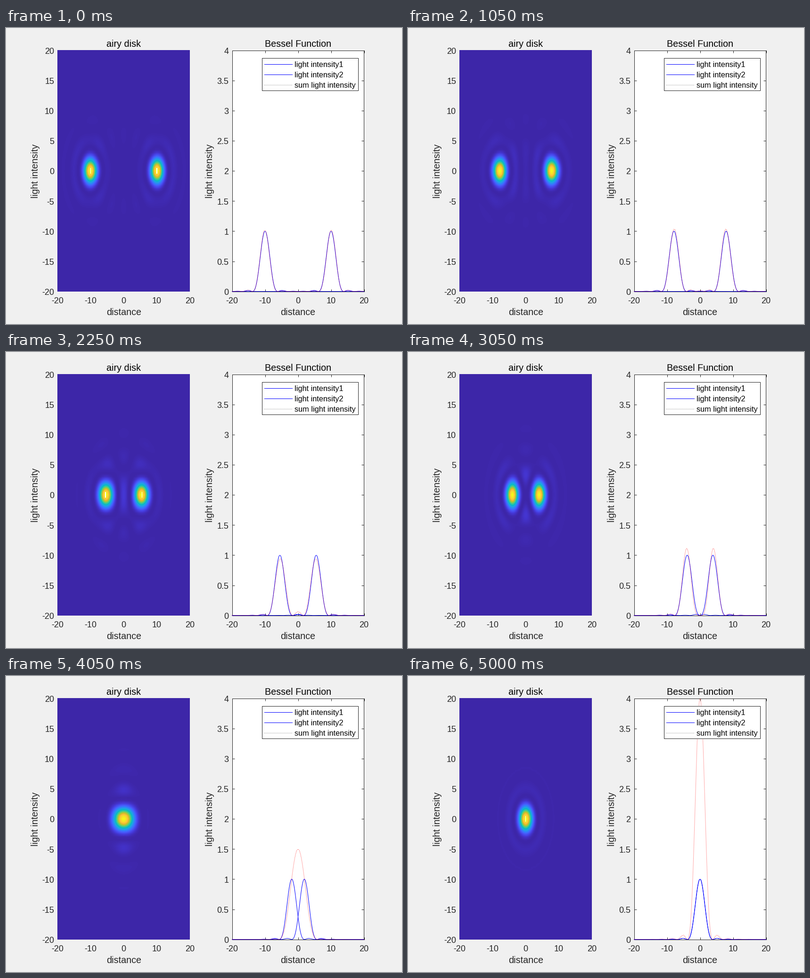
A matplotlib script for the animation above (5.05 s loop, 840 by 630 pixels).

```python
import numpy as np
import matplotlib.pyplot as plt
from matplotlib.animation import FuncAnimation
from matplotlib.colors import LinearSegmentedColormap
from matplotlib.lines import Line2D
from matplotlib.patches import Rectangle
from matplotlib.transforms import Affine2D

W, H, DPI = 840, 630, 100
FRAMES, STEP_MS = 101, 50
PT = 72 / DPI
GREY = (0.15, 0.15, 0.15)
DOTS = (0, (1, 2))

# Panel edges in pixels from the top left
LEFT, RIGHT = (109.2, 390.35), (479.5, 759.5)
TOP, BOTTOM = 47.25, 560.7

plt.rcParams["font.family"] = "Liberation Sans"

PARULA = [
    (.2422, .1504, .6603), (.2647, .1978, .7952), (.2783, .2559, .8991),
    (.2810, .3228, .9579), (.2699, .3892, .9906), (.2206, .4603, .9973),
    (.1786, .5289, .9682), (.1540, .5902, .9218), (.1248, .6459, .8883),
    (.0689, .6948, .8394), (.0067, .7312, .7660), (.1408, .7584, .6842),
    (.2161, .7843, .5923), (.3406, .8008, .4789), (.5044, .7993, .3480),
    (.6720, .7793, .2227), (.8203, .7498, .1535), (.9393, .7288, .2100),
    (.9970, .7659, .2199), (.9786, .8386, .1766), (.9597, .9135, .1423),
    (.9769, .9839, .0805),
]
cmap = LinearSegmentedColormap.from_list("parula", PARULA)
cmap.set_bad("white")

# Airy amplitude 2*J1(r)/r, tabulated once from Bessel's integral
theta = (np.arange(120) + 0.5) * np.pi / 120
r_tab = np.linspace(0, 45, 9001)
j1 = np.cos(theta - r_tab[:, None] * np.sin(theta)).mean(axis=1)
amp_tab = np.ones_like(r_tab)
amp_tab[1:] = 2 * j1[1:] / r_tab[1:]


def airy(r):
    """Amplitude at distance r; undefined (0/0) exactly at the centre."""
    return np.where(r == 0, np.nan, np.interp(r, r_tab, amp_tab))


half = -20 + 0.1 * np.arange(201)
x = np.concatenate([half, -half[-2::-1]])
y = np.linspace(-20, 20, 81)[:, None]


def cells(n, first, lo, hi, count):
    """Grid cell and fraction inside it for each of n pixel centres."""
    pos = (first + 0.5 + np.arange(n) - lo) / (hi - lo) * count
    i = np.minimum(pos.astype(int), count - 1)
    return i, pos - i


NX, NY = 281, 514
ix, fx = cells(NX, 109, *LEFT, 400)
iy, fy = cells(NY, 47, TOP, BOTTOM, 80)
fy = fy[:, None]


def shade(z):
    """Interpolated shading; cells touching an undefined corner stay empty."""
    rows = z[iy] * (1 - fy) + z[iy + 1] * fy
    return rows[:, ix] * (1 - fx) + rows[:, ix + 1] * fx


fig = plt.figure(figsize=(W / DPI, H / DPI), dpi=DPI, facecolor="#f0f0f0")
px = Affine2D().scale(1 / W, -1 / H).translate(0, 1) + fig.transFigure


def panel(x0, x1, top, bottom):
    return fig.add_axes([x0 / W, 1 - bottom / H, (x1 - x0) / W, (bottom - top) / H])


def label(cx, base, s, size, color=GREY, ha="center", rot=0):
    va = "center" if rot else "baseline"
    fig.text(cx, base, s, fontsize=size * PT, color=color, ha=ha, va=va,
             rotation=rot, transform=px)


def label_axes(edges, title, ylabel_x, yticks, ylim):
    x0, x1 = edges
    mid = (x0 + x1) / 2
    for v in (-20, -10, 0, 10, 20):
        label(x0 + (v + 20) / 40 * (x1 - x0), 586, str(v), 18)
    for v in yticks:
        ty = BOTTOM - (v - ylim[0]) / (ylim[1] - ylim[0]) * (BOTTOM - TOP)
        label(x0 - 7, ty + 7.5, f"{v:g}", 18, ha="right")
    label(mid, 40, title, 19.8, "black")
    label(mid, 611, "distance", 19.8)
    label(ylabel_x, 304, "light intensity", 19.8, rot=90)


# Left panel: intensity map
ax_map = panel(109, 109 + NX, 47, 47 + NY)
ax_map.axis("off")
img = ax_map.imshow(np.zeros((NY, NX)), cmap=cmap, aspect="auto",
                    interpolation="nearest")
label_axes(LEFT, "airy disk", 62, range(-20, 21, 5), (-20, 20))

# Right panel: section through both centres
ax = panel(*RIGHT, 47.5, BOTTOM)
ax.set(xlim=(-20, 20), ylim=(0, 4), xticks=range(-20, 21, 10),
       yticks=np.arange(0, 4.1, 0.5))
ax.tick_params(direction="in", length=5 * PT, width=PT, color=GREY, top=True,
               right=True, labelbottom=False, labelleft=False)
ax.set_axisbelow(True)
for spine in ax.spines.values():
    spine.set(linewidth=PT, color=GREY, zorder=1)
label_axes(RIGHT, "Bessel Function", 432, np.arange(0, 4.1, 0.5), (0, 4))


def curve(color, style="-"):
    return ax.plot([], [], color=color, ls=style, lw=PT, clip_on=False)[0]


line1, line2, total = curve("blue"), curve("blue"), curve("red", DOTS)

# Legend
fig.add_artist(Rectangle((542.5, 63.5), 204, 69, facecolor="white",
                         edgecolor=GREY, lw=PT, transform=px))
entries = [("light intensity1", "blue", "-"), ("light intensity2", "blue", "-"),
           ("sum light intensity", "#606060", DOTS)]
for i, (name, color, style) in enumerate(entries):
    ly = 76.5 + 22 * i
    fig.add_artist(Line2D([548, 607], [ly, ly], color=color, ls=style, lw=PT,
                          transform=px))
    label(612, ly + 6.5, name, 16.2, "black", ha="left")


def update(k):
    d = 10 - 0.1 * k
    z = (airy(np.hypot(x + d, y)) + airy(np.hypot(x - d, y))) ** 2
    img.set_data(np.ma.masked_invalid(shade(z)))
    img.set_clim(np.nanmin(z), np.nanmax(z))

    a, b = airy(np.abs(x + d)), airy(np.abs(x - d))
    line1.set_data(x, a ** 2)
    line2.set_data(x, b ** 2)
    total.set_data(x, (a + b) ** 2)
    return img, line1, line2, total


anim = FuncAnimation(fig, update, frames=FRAMES, interval=STEP_MS,
                     init_func=lambda: update(0), repeat=True, repeat_delay=0)
plt.show()
```
